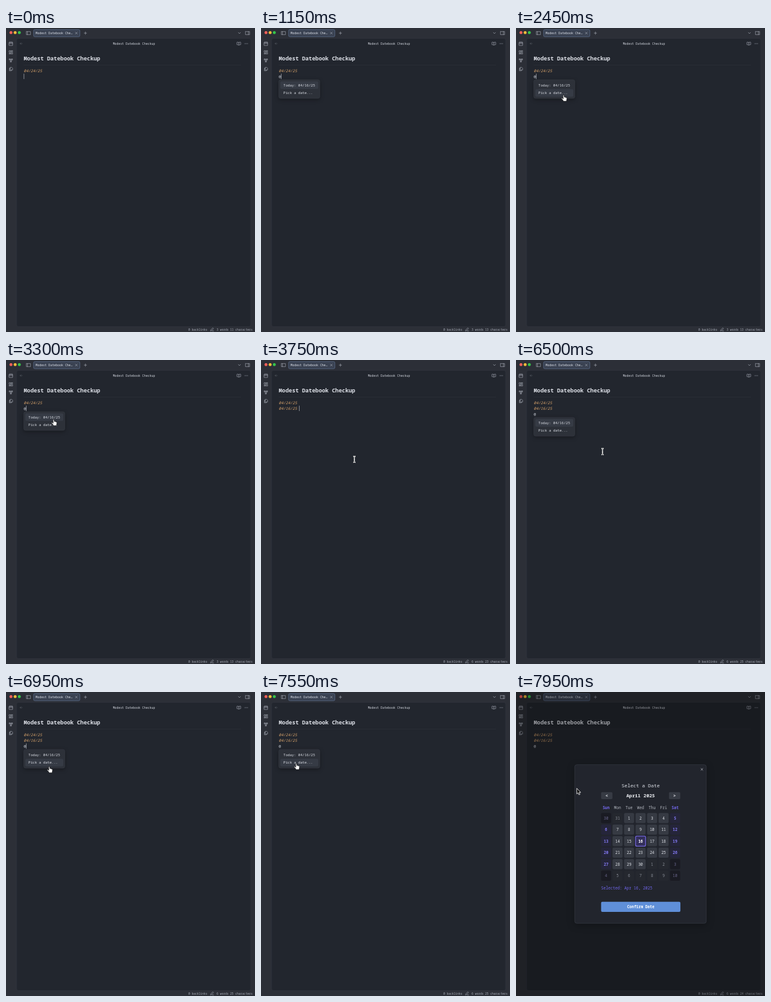
Recreate the animation shown at these times as an HTML page. Size 400 by 488 pixels, loop 8000 ms.

```html
<!DOCTYPE html>
<html lang="en">
<head>
<meta charset="utf-8">
<title>Date picker note</title>
<style>
html, body { margin: 0; width: 100%; height: 100%; overflow: hidden; background: #2c2f37; }
svg { display: block; width: 400px; height: 488px; }
text { font-family: "Noto Sans Mono", "DejaVu Sans Mono", monospace; white-space: pre; }
.icon { fill: none; stroke: #a4a9b4; stroke-width: .65; stroke-linecap: round; stroke-linejoin: round; }
.date { font-style: italic; }
.bold { font-weight: 700; }
.medium { font-weight: 500; }
.mid { text-anchor: middle; }
#menu { filter: drop-shadow(0 2px 3px #0005); }
#dialog { filter: drop-shadow(0 3px 6px #0004); }
</style>
</head>
<body>
<svg id="stage" viewBox="0 0 400 488"></svg>
<script>
const LOOP = 8000, STEP = 50, LINE = 9.15;
const TITLE = 'Modest Datebook Checkup';

const rect = (x, y, w, h, fill, r = 0, extra = '') =>
  `<rect x="${x}" y="${y}" width="${w}" height="${h}" rx="${r}" fill="${fill}" ${extra}/>`;
// y is the middle of the capitals
const text = (x, y, str, size, fill, cls = '', id = '') =>
  `<text x="${x}" y="${(y + size * .357).toFixed(2)}" font-size="${size}" fill="${fill}" class="${cls}" id="${id}">${str}</text>`;
const icon = (x, y, d, extra = '') =>
  `<path class="icon" transform="translate(${x} ${y})" d="${d}" ${extra}/>`;
const group = (id, body) => `<g id="${id}">${body}</g>`;

const CROSS = 'M-1.5-1.5 1.5 1.5M1.5-1.5-1.5 1.5';
const PANEL = 'M-2.3-2.3h5.6v5h-6.6v-5z';
const ARROW = 'M-1.7 0H1.7M-1.7 0l1.4-1.4M-1.7 0l1.4 1.4';

function chrome() {
  const lights = ['#f9605a', '#f7bd3b', '#36c64b']
    .map((c, i) => `<circle cx="${8 + i * 6.7}" cy="7.4" r="2.4" fill="${c}"/>`).join('');
  return rect(0, 0, 400, 488, '#2c2f37') +
    rect(17, 16.5, 376, 463, '#22262e', 3, 'stroke="#343842" stroke-width=".6"') +
    lights +
    icon(36, 8, PANEL + 'M-1.4-2.3v5') +
    rect(44.3, 2.6, 74.4, 11.4, '#3a4252', 2, 'stroke="#5c7090" stroke-width=".7"') +
    text(47.5, 8.2, TITLE.slice(0, 19) + '…', 4.95, '#dfe3eb') +
    icon(113, 8.2, CROSS) +
    icon(127.6, 8.2, 'M-2 0h4M0-2v4') +
    icon(375, 8, 'M-1.8-.8 0 1l1.8-1.8') +
    icon(388, 8, PANEL + 'M1.3-2.3v5') +
    icon(8, 25, 'M-2.7-2h5.4v5h-5.4zM-2.7-.3h5.4M-1.3-3v1.6M1.3-3v1.6') +
    icon(8, 39, 'M-2.6-2.6h2v2.6h-2zM.7-2.6h2v1.5h-2zM-2.6 1.4h2v1.3h-2zM.7.3h2v2.4h-2z') +
    icon(8, 52, 'M-2.6-2.4h1.6v1.6h-1.6zM1-2.4h1.6v1.6H1zM-.8 1h1.6v1.6h-1.6zM-1.3-.8-.3 1M1.4-.8.3 1M-1-1.6h2') +
    icon(8, 66, 'M-1-2.8h2.3l1.4 1.4v2.7H-1zM-1-1.3h-1.6v4h3.4V1.4') +
    icon(24.5, 25, ARROW, 'opacity=".35"') +
    icon(37.2, 25, ARROW, 'opacity=".35" style="scale:-1 1"') +
    text(205.5, 25, TITLE, 4.93, '#d0d4dc', 'mid') +
    icon(374, 25, 'M0-1.6C-.8-2.3-2-2.3-3-2.2v4c1 0 2.200 0 3 .8.8-.8 2-.8 3-.8v-4c-1-.1-2.200-.1-3 .6zM0-1.6v4.200') +
    [-2, 0, 2].map(d => `<circle cx="${386 + d}" cy="25" r=".6" fill="#a4a9b4"/>`).join('') +
    text(28.5, 49.2, TITLE, 8.92, '#dcdfe6', 'bold') +
    rect(28.5, 59, 349, .5, '#30343d') +
    text(293, 484, '0 backlinks', 4.62, '#a9aeb9') +
    icon(331, 484, 'M-2.3 2l.5-1.7 3-3 1.200 1.200-3 3zM.3 2.200h2.200') +
    text(338.3, 484, '', 4.6, '#a9aeb9', '', 'words') +
    text(360, 484, '', 4.62, '#a9aeb9', '', 'chars');
}

function note() {
  const row = i => 69 + i * LINE;
  return text(28.5, row(0), '04/24/25', 6.12, '#dba56c', 'date medium') +
    text(28.5, row(1), '04/16/25', 6.12, '#dba56c', 'date medium', 'newDate') +
    text(28.5, 0, '@', 6.12, '#ccd0d8', '', 'at') +
    rect(0, 0, .6, 8.6, '#c8ccd6', 0, 'id="caret"');
}

function menu() {
  return rect(28.5, 83, 66, 30, '#2d3139', 3, 'stroke="#383c46" stroke-width=".5"') +
    rect(31, 0, 61, 12.2, '#363b45', 2, 'id="hover"') +
    text(36, 92, 'Today: 04/16/25', 5.66, '#dcdfe6') +
    text(36, 104.2, 'Pick a date...', 5.66, '#dcdfe6');
}

function dayCell(i) {
  const col = i % 7, row = Math.floor(i / 7), n = i - 1;
  const weekend = col % 6 === 0, inMonth = n >= 1 && n <= 30, picked = n === 16;
  const day = n < 1 ? n + 31 : n > 30 ? n - 30 : n;
  const x = 144.7 + col * 18.48, y = 202.4 + row * 18.5;
  let [bg, ink] = weekend
    ? (inMonth ? ['#25253a', '#8279f2'] : ['#1a1b23', '#68658a'])
    : (inMonth ? ['#363a43', '#dfe2e8'] : ['#25282f', '#888c95']);
  if (picked) [bg, ink] = ['#34305c', '#ffffff'];
  const edge = picked ? 'stroke="#7e70f2" stroke-width="1.1"' : '';
  return rect((x - 8.1).toFixed(2), y - 8.1, 16.2, 16.2, bg, 2, edge) +
    text(x.toFixed(2), y, day, 6.2, ink, 'mid ' + (picked || weekend && inMonth ? 'bold' : 'medium'));
}

function dialog() {
  const names = ['Sun', 'Mon', 'Tue', 'Wed', 'Thu', 'Fri', 'Sat'].map((name, i) =>
    text(144.7 + i * 18.48, 186, name, 6.2, i % 6 ? '#b4b8c0' : '#7469ee', 'mid ' + (i % 6 ? 'medium' : 'bold')));
  const arrows = [['&lt;', 136.7], ['&gt;', 245.7]].map(([sign, x]) =>
    rect(x, 160.8, 18.2, 11.2, '#373b44', 1.8) + text(x + 9.1, 166.6, sign, 7.4, '#e6e8ee', 'mid bold'));
  return rect(94.3, 116.7, 211.4, 254.6, '#22252d', 3.5, 'stroke="#373b44" stroke-width=".7"') +
    icon(298.6, 124.2, CROSS, 'style="stroke:#d0d3da"') +
    text(200.2, 149.700, 'Select a Date', 7.88, '#dcdfe6', 'mid medium') +
    text(200.2, 166.700, 'April 2025', 7.66, '#eef0f4', 'mid bold') +
    arrows.join('') + names.join('') +
    Array.from({ length: 42 }, (_, i) => dayCell(i)).join('') +
    text(136.8, 314.6, 'Selected: Apr 16, 2025', 6.22, '#7066ec') +
    rect(136.7, 336.8, 127.4, 16.2, '#5f8fd9', 2) +
    text(200.4, 345.200, 'Confirm Date', 6.1, '#ffffff', 'mid bold');
}

// Each pointer has its hot spot at 0,0
const POINTERS = {
  beam: `<path d="M-2-4.800Q-.3-4.800 0-3.900Q.3-4.800 2-4.800M0-3.900V3.900M-2 4.800Q-.3 4.800 0 3.900Q.3 4.800 2 4.800M-1 .9h2" fill="none" stroke="#fff" stroke-width="1.700"/>
    <path d="M-1.800-4.800Q-.3-4.800 0-3.900Q.3-4.800 1.800-4.800M0-3.900V3.900M-1.800 4.800Q-.3 4.800 0 3.900Q.3 4.800 1.800 4.800" fill="none" stroke="#333" stroke-width=".5"/>`,
  hand: `<path d="M-.8.6C-.8-.4.7-.4.8.6L1.200 3.300C1.800 2.700 2.600 2.900 2.800 3.600C3.500 3.200 4.200 3.500 4.300 4.200C5 4 5.600 4.400 5.500 5.200L5 8.200 4.500 9.800H.1L-.8 8.200-3 5.700C-3.400 4.900-2.600 4.400-1.900 4.900L-.3 6Z" fill="#fff" stroke="#111" stroke-width=".6" stroke-linejoin="round"/>`,
  arrow: `<path d="M0 0V9L2 7.200 3.400 10.400 5 9.700 3.600 6.600H6.300Z" fill="#0a0a0a" stroke="#fff" stroke-width=".8" stroke-linejoin="round"/>`
};

document.getElementById('stage').innerHTML = chrome() + note() + group('menu', menu()) +
  group('modal', rect(0, 0, 400, 488, '#000', 0, 'opacity=".3"') + group('dialog', dialog())) +
  group('pointer', Object.entries(POINTERS).map(([id, body]) => group(id, body)).join(''));

const el = id => document.getElementById(id);
const show = (id, on) => el(id).setAttribute('visibility', on ? 'visible' : 'hidden');
const move = (id, x, y) => el(id).setAttribute('transform', `translate(${x} ${y})`);

const T = { at1: 150, pick1: 3400, enter: 4650, at2: 5800, modal: 7650 };
const CARETS = [[0, 28.6, 1], [T.at1, 32.4, 1], [T.pick1, 61, 1], [T.enter, 28.6, 2], [T.at2, 32.4, 2]];
const COUNTS = [[0, 11], [150, 13], [3450, 23], [4750, 24], [5850, 25], [7700, 24]];
const PATHS = [
  [[1950, 193, 209], [2100, 160, 178], [2450, 76.3, 107.8], [2650, 76.3, 95.5], [3400, 76.3, 95.5], [3700, 150, 159.5], [T.enter, 150, 159.5]],
  [[6400, 150, 159], [6500, 139, 147], [7100, 56.4, 114.8], [7600, 56.4, 114.8], [7900, 97.7, 154.6], [LOOP, 97.7, 154.6]]
];

const latest = (list, t) => list.filter(item => item[0] <= t).pop();

function pointerAt(t) {
  const path = PATHS.find(p => t >= p[0][0] && t < p[p.length - 1][0]);
  if (!path) return null;
  const i = path.findIndex(p => p[0] > t);
  const [t0, x0, y0] = path[i - 1], [t1, x1, y1] = path[i];
  const u = (t - t0) / (t1 - t0), k = u * u * (3 - 2 * u);
  return { x: x0 + (x1 - x0) * k, y: y0 + (y1 - y0) * k };
}

function draw(t) {
  const modal = t >= T.modal;
  const first = t >= T.at1 && t < T.pick1, second = t >= T.at2;
  const menuOpen = first || second && !modal;
  const drop = second ? LINE : 0;

  show('newDate', t >= T.pick1);
  show('at', first || second);
  move('at', 0, 78.100 + drop);
  el('at').setAttribute('y', 2.1);

  const [start, x, line] = latest(CARETS, t);
  show('caret', !modal && Math.floor((t - start) / 500) % 2 === 0);
  move('caret', x, 64.2 + line * LINE);

  const p = pointerAt(t);
  const y = p ? p.y - drop : 0;
  const overMenu = menuOpen && p && p.x > 28.5 && p.x < 94.5 && y > 83 && y < 113;
  show('menu', menuOpen);
  move('menu', 0, drop);
  el('hover').setAttribute('y', overMenu && y > 98 ? 98.2 : 85.6);

  show('modal', modal);
  const kind = modal ? 'arrow' : overMenu ? 'hand' : 'beam';
  for (const id in POINTERS) show(id, p && id === kind);
  if (p) move('pointer', p.x, p.y);

  el('words').textContent = (t < 3450 ? 3 : 6) + ' words';
  el('chars').textContent = latest(COUNTS, t)[1] + ' characters';
}

const began = performance.now();
function tick() {
  const t = (performance.now() - began) % LOOP;
  draw(Math.floor(t / STEP) * STEP);
  requestAnimationFrame(tick);
}
tick();
</script>
</body>
</html>
```
